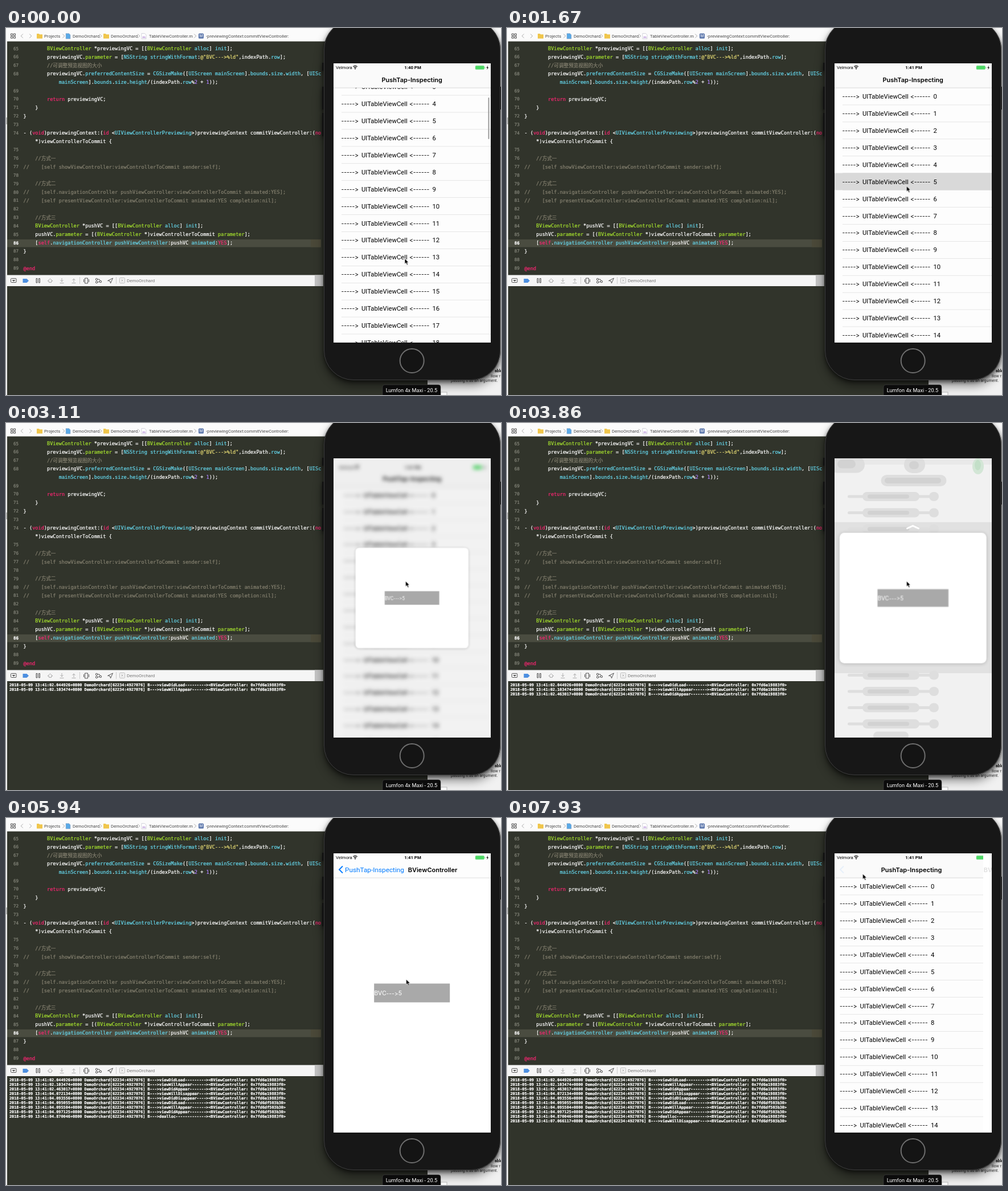
Animation of 869 by 644 pixels, one loop 8 s. Source, as an HTML page:

```html
<!DOCTYPE html>
<html lang="en">
<head>
<meta charset="utf-8">
<title>Preview demo</title>
<style>
html, body { margin: 0; width: 100%; height: 100%; overflow: hidden; background: #31342b; }
svg { display: block; }
text { dominant-baseline: central; white-space: pre; font-family: Roboto, "Liberation Sans", sans-serif; }
.mono text { font: 8.6px "DejaVu Sans Mono", "Noto Sans CJK SC", monospace; color: #fff; }
.mono text, .mono tspan { fill: currentColor; stroke: currentColor; stroke-width: .22px; }
.mono .num { font-size: 7.6px; color: #85867b; }
.mono .now { font-weight: bold; color: #fff; }
.mono .c { color: #858170; }
.y { color: #e6db74; } .k { color: #f92672; } .g { color: #a6e22e; } .t { color: #66d9ef; } .n { color: #ae81ff; }
#logs text { font: bold 6.83px "DejaVu Sans Mono", monospace; }
#path text { font-size: 7.7px; fill: #4a4a4a; }
.line { fill: none; stroke: #555; }
.cell { font-size: 11.3px; }
.dash { font-family: Inter, sans-serif; font-size: 10.3px; font-feature-settings: "calt" 0; }
.title { font: 600 11px Inter, sans-serif; text-anchor: middle; }
.stat { font-size: 7.8px; }
.scaled { transform-origin: 712.7px 307px; }
</style>
</head>
<body>
<svg width="869" height="644" viewBox="0 0 869 644">
  <defs>
    <clipPath id="glass"><rect x="575" y="62.500" width="276" height="489.500"/></clipPath>
  </defs>

  <!-- editor -->
  <rect width="869" height="644" fill="#f1f1f1"/>
  <rect x="2" y="23" width="738" height="621" fill="#31342b"/>
  <rect x="2" y="371" width="551" height="13.500" fill="#4a4c40"/>
  <rect x="535" y="371" width="18" height="13.500" fill="#4a4838"/>
  <rect width="869" height="23.500" fill="#fbfbfb"/>
  <rect y="157" width="2" height="12" fill="#bbb"/>
  <g id="path"></g>
  <g id="code" class="mono"></g>

  <!-- debug bar and console -->
  <rect x="2" y="433.500" width="555" height="19.500" fill="#f5f5f5"/>
  <rect x="542" y="433.500" width="15" height="19.500" fill="#c4c4c4"/>
  <g class="line">
    <rect x="8.5" y="439.5" width="9.5" height="7" rx="1"/>
    <path d="M53 439.5h2v7.500h-2zM57.500 439.500h2v7.500h-2z"/>
    <path d="M73 444l4.500-4 4.500 4h-2.500v2.500h-4v-2.500zM98 439v6m-2.500-2.500l2.500 2.500 2.500-2.500M94.500 447.500h7M119 446v-6m-2.500 2.500l2.500-2.500 2.500 2.500M115.500 447.500h7" stroke="#aaa"/>
    <path d="M129.500 437v12M193.500 437v12" stroke="#ccc"/>
    <path d="M138.500 439h5v9h-5zM136.500 441v5M145.500 441v5"/>
    <circle cx="159" cy="441" r="1.7"/><circle cx="159" cy="446" r="1.7"/><circle cx="166" cy="445" r="1.7"/>
    <path d="M161 441h3l1 2.500M161 446l3.500-1M178.500 443.500l9-4.500-4 9-1-4z"/>
    <rect x="199.500" y="438.500" width="9" height="9" rx="1" stroke="#bbb"/>
    <path d="M202 441l4 4m0-4l-4 4" stroke="#bbb"/>
  </g>
  <path d="M10.500 442h6l-3 3z" fill="#555"/>
  <path d="M29.500 440h7l3.500 3.500-3.500 3.500h-7z" fill="#4d8fe0"/>
  <text x="212" y="443.5" font-size="8" fill="#777">DemoOrchard</text>
  <g id="logs" class="mono"></g>

  <!-- window behind the phone -->
  <g font-size="7" fill="#333">
    <text x="858" y="602" font-weight="bold" fill="#111">able</text>
    <text x="851" y="611">llow r</text>
    <text x="781" y="619">passing it as an argument.</text>
    <rect x="763" y="639" width="11" height="8" fill="#fff" stroke="#bbb"/>
  </g>

  <!-- phone -->
  <g style="filter: drop-shadow(0 3px 3px rgba(0,0,0,.5)) drop-shadow(0 8px 8px rgba(0,0,0,.45))">
    <path d="M555 61h4v14h-4zM555 103h4v40h-4zM555 149h4v41h-4zM866 103h3v40h-3z" fill="#111"/>
    <rect x="558" y="-14" width="310" height="632" rx="52" fill="#171717"/>
  </g>
  <rect x="558.5" y="-13.500" width="309" height="631" rx="51.500" fill="none" stroke="#3d3d3d"/>
  <circle cx="712.7" cy="584" r="21" fill="#141414" stroke="#6e6e6e" stroke-width="2"/>
  <rect x="661" y="626" width="102" height="24" rx="4" fill="#0b0b0b" stroke="#444" stroke-width=".6"/>
  <text x="712" y="635.500" font-size="9.2" fill="#fff" text-anchor="middle">Lumfon 4x Maxi - 20.5</text>

  <g clip-path="url(#glass)">
    <g id="list" class="scaled">
      <rect x="540" y="30" width="350" height="560" fill="#fdfdfd"/>
      <g id="slide"><g id="rows"></g></g>
      <rect id="thumb" x="846.5" y="122" width="2" height="73" rx="1" fill="#9a9a9a"/>
      <rect x="540" y="30" width="350" height="75" fill="#fafafa"/>
      <rect x="540" y="104.700" width="350" height=".7" fill="#c8c8c8"/>
      <text id="home" class="title" x="712.7" y="90.500">PushTap-Inspecting</text>
      <g id="status"></g>
    </g>
    <rect id="tint" x="575" y="62" width="276" height="490"/>
    <g id="focus" class="scaled"></g>

    <g id="haze">
      <rect x="575" y="62" width="276" height="490" fill="#f1f1f1"/>
      <path d="M575 62h276v11h-276z" fill="#e9e9e9"/>
      <rect x="575" y="174" width="276" height="265" fill="#e1e1e1"/>
      <g id="blobs" fill="#dedede"></g>
    </g>
    <path id="hint" d="M702.5 185l10-4.500 10 4.500" fill="none" stroke="#fff" stroke-width="3" stroke-linecap="round"/>
    <g id="card" class="scaled">
      <rect id="sheet" class="scaled" x="575" y="184.700" width="275.500" height="244.600" rx="9" fill="#fff" style="filter: drop-shadow(0 1px 4px rgba(0,0,0,.2))"/>
      <g class="label"></g>
    </g>

    <g id="detail" class="scaled">
      <g id="body">
        <rect x="575" y="62" width="350" height="560" fill="#fff"/>
        <g class="label"></g>
      </g>
      <g id="bar">
        <rect x="540" y="30" width="350" height="75" fill="#fdfdfd"/>
        <rect x="540" y="104.700" width="350" height=".7" fill="#d0d0d0"/>
        <g id="status2"></g>
      </g>
      <path id="chev" d="M591 84.500l-6 6 6 6" fill="none" stroke="#007aff" stroke-width="1.900"/>
      <text id="back" x="595" y="90.500" font-size="11.8" fill="#007aff">PushTap-Inspecting</text>
      <text id="name" class="title" x="749" y="90.500">BViewController</text>
    </g>
  </g>

  <path id="cursor" d="M0 0v9.500l2.200-2 1.700 3.700 1.700-.8-1.600-3.500h3z" fill="#000" stroke="#fff" stroke-width=".7"/>
</svg>

<script>
const LOOP = 8000;
const $ = id => document.getElementById(id);
const fill = (id, parts) => { $(id).innerHTML = [].concat(parts).join(''); };
const esc = s => s.replace(/</g, '&lt;');

// breadcrumb
const arrow = (x, dir = 1, h = 3.5) => `<path class="line" style="stroke:#aaa" d="M${x - dir * h / 2} ${14 - h}l${dir * h} ${h}l${-dir * h} ${h}"/>`;
const folder = x => `<path d="M${x} 10h4l1 1.200h5v7.300h-10z" fill="#f0c64c"/>`;
const page = (x, color) => `<path d="M${x} 9.500h5.500l2.500 2.500v7h-8z" fill="${color}" stroke="#aab" stroke-width=".5"/>`;
const crumb = (x, s) => `<text x="${x}" y="14">${s}</text>`;
fill('path', [
  '<path class="line" d="M8.500 10h3.200v3.200h-3.200zM13.300 10h3.200v3.200h-3.200zM8.500 14.800h3.200v3.200h-3.200zM13.300 14.800h3.200v3.200h-3.200z"/>',
  arrow(28, -1), arrow(43), folder(54), crumb(67, 'Projects'), arrow(101),
  page(105, '#5aa9e6'), crumb(117, 'DemoOrchard'), arrow(166),
  folder(171), crumb(184, 'DemoOrchard'), arrow(233),
  page(238, '#fff'), '<text x="239.500" y="15.500" style="fill:#8a4fc0;font-size:6px">m</text>',
  crumb(251, 'TableViewController.m'), arrow(332),
  '<rect x="338" y="9.500" width="9" height="9" rx="1.500" fill="#5b76ab"/><text x="339.400" y="14" style="fill:#fff;font-size:7px">M</text>',
  crumb(351, '-previewingContext:commitViewController:')
]);

// code; a leading ~ marks a wrapped line
const code = `        BViewController *previewingVC = [[BViewController alloc] init];
        previewingVC.parameter = [NSString stringWithFormat:@"BVC--->%ld",indexPath.row];
        //可调整预览视图的大小
        previewingVC.preferredContentSize = CGSizeMake([UIScreen mainScreen].bounds.size.width, [UISc
~            mainScreen].bounds.size.height/(indexPath.row%2 + 1));

        return previewingVC;
    }
}

- (void)previewingContext:(id <UIViewControllerPreviewing>)previewingContext commitViewController:(no
~    *)viewControllerToCommit {

    //方式一
//    [self showViewController:viewControllerToCommit sender:self];

    //方式二
//    [self.navigationController pushViewController:viewControllerToCommit animated:YES];
//    [self presentViewController:viewControllerToCommit animated:YES completion:nil];

    //方式三
    BViewController *pushVC = [[BViewController alloc] init];
    pushVC.parameter = [(BViewController *)viewControllerToCommit parameter];
    [self.navigationController pushViewController:pushVC animated:YES];
}

@end`;
const tokens = /(@"[^"]*")|(@end|\b(?:void|id|self|return|YES|no)\b)|(\b(?:BViewController|parameter)\b)|(\b(?:NSString|stringWithFormat|row|preferredContentSize|CGSizeMake|UIScreen|UISc|mainScreen|bounds|size|width|height|alloc|init|navigationController|pushViewController|animated|UIViewControllerPreviewing)\b)|(\b[12]\b)/g;
const paint = s => esc(s).replace(tokens, (m, ...g) => `<tspan class="${'ykgtn'[g.findIndex(Boolean)]}">${m}</tspan>`);
let num = 64;
fill('code', code.split('\n').map((raw, i) => {
  const wrapped = raw[0] === '~';
  const s = raw.replace('~', ''), text = s.trimStart();
  const y = 36 + i * 14.83, x = 30.6 + (s.length - text.length) * 5.177;
  const label = wrapped ? '' : `<text class="num ${++num === 86 ? 'now' : ''}" x="13" y="${y}">${num}</text>`;
  const note = text.startsWith('//');
  return label + `<text x="${x}" y="${y}" class="${note ? 'c' : ''}">${note ? text : paint(text)}</text>`;
}));

// console: shown at, clock, event, object
const A = '0x7fd6e19883f0', B = '0x7fd6df503b30';
const logs = [
  [2900, '02.044926', 'viewDidLoad', A], [2900, '02.103474', 'viewWillAppear', A],
  [3380, '02.463017', 'viewDidAppear', A], [4870, '04.072134', 'viewWillDisappear', A],
  [4870, '04.093556', 'viewDidDisappear', A], [4870, '04.095055', 'viewDidLoad', B],
  [4870, '04.095504', 'viewWillAppear', B], [4870, '04.097125', 'viewDidAppear', B],
  [5580, '04.870046', 'dealloc', A], [7550, '07.066117', 'viewWillDisappear', B]
];
fill('logs', logs.map(([, clock, event, obj], i) =>
  `<text id="log${i}" x="6" y="${460 + i * 8}">${esc(`2018-05-09 13:41:${clock}+0800 DemoOrchard[62234:4927076] ${('B--->' + event).padEnd(25, '-')}><BViewController: ${obj}>`)}</text>`));

// phone screens
const cell = i => {
  const y = 120 + i * 29.93;
  return `<text class="cell" y="${y}"><tspan class="dash" x="588.500">-----&gt;</tspan><tspan x="624">UITableViewCell</tspan><tspan class="dash" x="708">&lt;------</tspan><tspan x="748.500">${i}</tspan></text>`;
};
const rule = i => `<rect x="589" y="${134.6 + i * 29.93}" width="262" height=".7" fill="#dcdcdc"/>`;
fill('rows', Array.from({ length: 20 }, (_, i) => cell(i) + rule(i)));
fill('focus', `<rect x="570" y="254.500" width="286" height="30" fill="#d9d9d9"/>${cell(5)}`);

const clock = (id, s) => `<text id="${id}" class="stat" x="714" y="69.500" font-weight="bold" text-anchor="middle">${s}</text>`;
const status = clocks => `<text class="stat" x="579" y="69.500">Velmora</text>
  <path d="M609.300 67.800q3.700-3 7.400 0M610.900 69.800q2.100-1.700 4.200 0" fill="none" stroke="#000" stroke-width="1.300"/>
  <circle cx="613" cy="71.500" r="1"/>${clocks}
  <rect x="824" y="66.200" width="15.500" height="6.600" rx="1.500" fill="#4cd964" stroke="#8bdc98" stroke-width=".6"/>
  <rect x="840.300" y="68.300" width="1.200" height="2.500" fill="#8bdc98"/>
  <path d="M846 65.800l-2.600 4.200h1.600l-.7 3.300 2.700-4.300h-1.700z"/>`;
fill('status', status(clock('early', '1:40 PM') + clock('late', '1:41 PM')));
fill('status2', status(clock('late2', '1:41 PM')));

document.querySelectorAll('.label').forEach(g => g.innerHTML =
  `<rect x="646.200" y="290.500" width="133" height="33" fill="#a9a9a9"/>
   <text class="cell" x="646.200" y="307.500" fill="#fff">BVC<tspan class="dash">---&gt;</tspan>5</text>`);

// heavily blurred list behind the card
const pill = (x, y, w, h, color = '') => `<rect x="${x}" y="${y - h / 2}" width="${w}" height="${h}" rx="${h / 2}" ${color && `fill="${color}"`}/>`;
const core = '#d2d2d2';
const blob = i => {
  const y = 129 + i * 28.5;
  return pill(598, y, 145, 5) + pill(624, y, 100, 16) + pill(741, y, 17, 16) + pill(633, y, 73, 7, core);
};
fill('blobs', [
  pill(565, 73, 63, 29), pill(580, 72, 32, 15, core), pill(697, 73, 37, 30), pill(706, 74, 17, 14, core),
  pill(817, 76, 20, 28, '#d3e6d6'), pill(821, 74, 11, 18, '#c3dfc8'),
  pill(656.5, 101, 115, 20), pill(663, 101, 99, 10, core),
  ...[0, 1, 2, 11, 12, 13, 14].map(blob), pill(643, 549, 62, 15)
]);

// motion: every change is a hard cut, as in a low-rate screen capture
const track = (id, frames) => $(id).animate(
  Object.entries(frames).map(([t, f]) => ({ offset: t / LOOP, easing: 'step-end', ...f })),
  { duration: LOOP, iterations: Infinity });
const map = (frames, fn) => Object.fromEntries(Object.entries(frames).map(([t, v]) => [t, fn(v)]));
const move = (id, frames) => track(id, map(frames, ([x, y = 0, o = 1]) => ({ transform: `translate(${x}px,${y}px)`, opacity: o })));
const fade = (id, frames) => track(id, map(frames, opacity => ({ opacity })));
const zoom = (id, frames) => track(id, map(frames, ([s, o = 1]) => ({ transform: `scale(${s})`, opacity: o })));

logs.forEach(([t], i) => fade('log' + i, { 0: 0, [t]: 1 }));
fade('early', { 0: 1, 510: 0 });
fade('late', { 0: 0, 510: 1 });
move('rows', { 0: [0, -106.7], 210: [0, -9], 510: [0] });
move('thumb', { 0: [0], 210: [0, -12], 510: [0, -14, .5], 710: [0, -14, 0] });
zoom('focus', { 0: [1, 0], 1670: [1], 2900: [1.01], 3110: [1, 0] });
track('list', map({ 0: [1, 0], 2900: [.987, 1.4], 3110: [.965, 4], 4870: [1, 0] },
  ([s, b]) => ({ transform: `scale(${s})`, filter: b ? `blur(${b}px)` : 'none' })));
fade('tint', { 0: 0, 2900: .025, 3110: .045, 4870: 0 });
fade('haze', { 0: 0, 3380: 1, 4870: 0 });
fade('hint', { 0: 0, 3860: 1, 4630: 0 });
zoom('card', { 0: [.5, 0], 3110: [.72], 3380: [.96], 3590: [.945], 3860: [.936], 4630: [1.02], 4870: [1, 0] });
track('sheet', { 0: { transform: 'scaleY(1)' }, 4630: { transform: 'scaleY(1.6)' }, 4870: { transform: 'scaleY(1)' } });
zoom('detail', { 0: [1, 0], 4870: [1.078], 5080: [1.03], 5380: [1] });

move('slide', { 0: [0], 7740: [-33], 7930: [-4.500] });
move('home', { 0: [0], 7740: [-28, 0, .6], 7930: [-2.700] });
move('body', { 0: [0], 7740: [165], 7930: [261] });
fade('bar', { 0: 1, 7740: 0 });
fade('chev', { 0: 1, 7550: .4, 7740: .3, 7930: .08 });
move('back', { 0: [0], 7550: [0, 0, .4], 7740: [28, 0, .2], 7930: [60, 0, 0] });
move('name', { 0: [0], 7740: [60, 0, .45], 7930: [131, 0, .13] });

move('cursor', {
  0: [700, 404.5], 510: [701, 393], 710: [702, 365], 910: [703, 327], 1110: [702, 293], 1310: [701.5, 277.5],
  5940: [702.5, 283], 6170: [702, 281], 6470: [697, 265], 6628: [679, 218], 6785: [655, 160], 6943: [633, 115], 7100: [624.5, 98]
});
</script>
</body>
</html>
```
